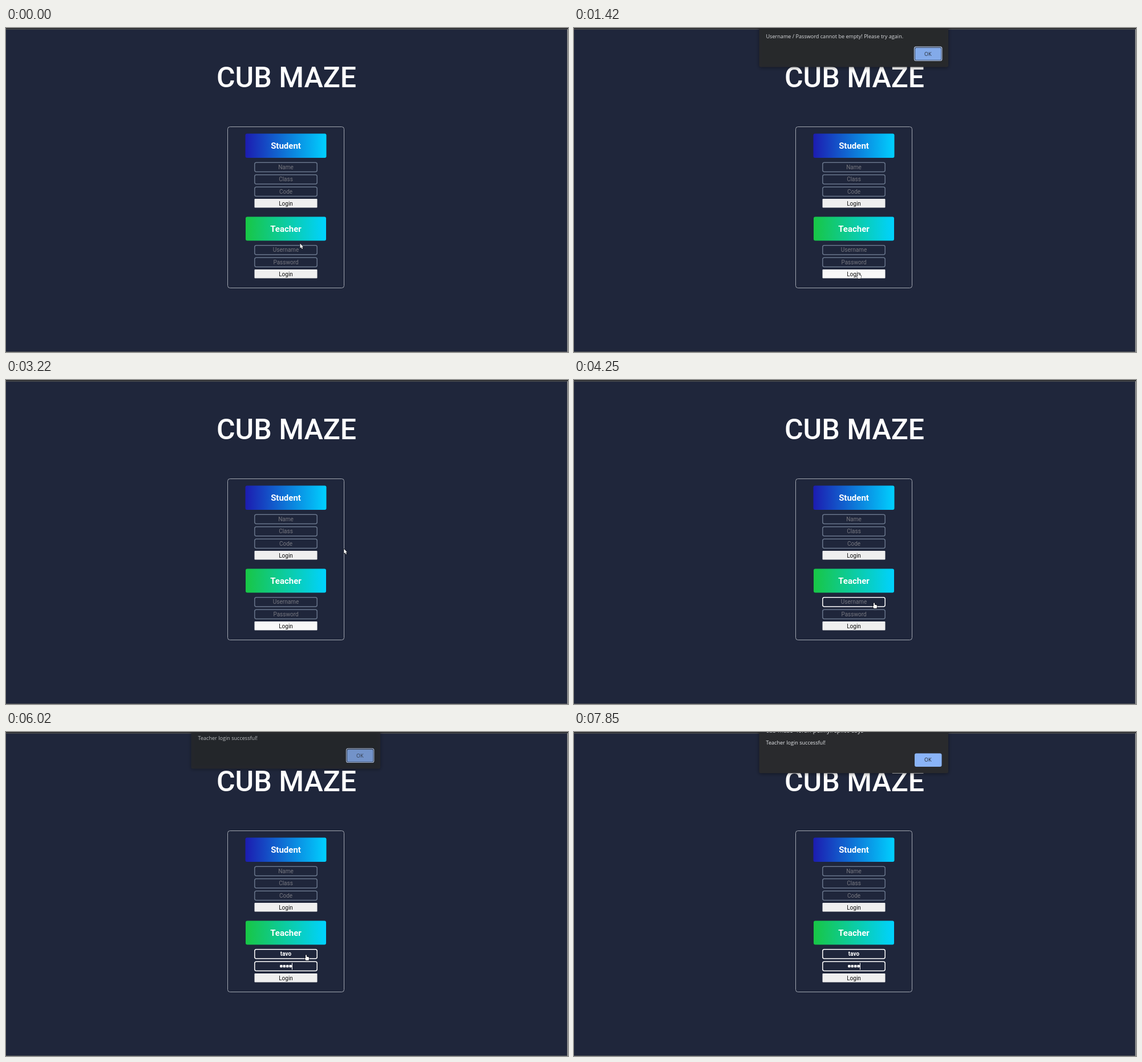
These frames come from a looping animation (985 by 569 pixels, 8.79 s). An HTML page with a canvas:

```html
<!DOCTYPE html>
<html lang="en">
<head>
<meta charset="utf-8">
<title>Cub Maze</title>
<style>
html, body { margin: 0; width: 100%; height: 100%; overflow: hidden; background: #1f263b; }
canvas { display: block; }
</style>
</head>
<body>
<canvas id="stage" width="985" height="569" aria-label="CUB MAZE login page"></canvas>
<script>
const ctx = document.getElementById('stage').getContext('2d');
const LOOP = 8790;
const UI = 'Roboto, sans-serif';
const DIALOG = '"Open Sans", sans-serif';
const MID = 490.5;
const ARROW = new Path2D('M0 0V8.2L1.9 6.5L3.2 9.4L4.6 8.8L3.3 6H5.6Z');
const HAND = new Path2D('M-.9 .9Q0-.5 .9 .9V3.6L4.4 4.4Q5.4 4.8 5.2 6L4.4 10H-.4L-2.5 6.6Q-2.6 5.4-.9 6.2Z');

// Pointer keys: time, x, y
const PATH = [
  [0, 515.5, 378.5], [170, 515.5, 378.5], [600, 508, 405], [1020, 498, 430],
  [1640, 498, 430], [1850, 580, 392], [2050, 679, 280], [2220, 672, 95],
  [2370, 630.5, 71], [2500, 624, 54], [2560, 624, 54], [2590, 624, 52],
  [3000, 624, 52], [3220, 592.5, 296], [3570, 526, 391], [6400, 526, 391],
  [6440, 533, 394], [6660, 533, 394], [6850, 700, 428], [7350, 942, 573],
  [LOOP, 942, 573]
];

const same = (a, b) => a[1] === b[1] && a[2] === b[2];

function slope(i, k) {
  const a = PATH[i - 1], b = PATH[i], c = PATH[i + 1];
  if (!a || !c || same(a, b) || same(b, c)) return 0;
  return (c[k] - a[k]) / (c[0] - a[0]);
}

function pointerAt(t) {
  let i = 0;
  while (i < PATH.length - 2 && PATH[i + 1][0] <= t) i++;
  const a = PATH[i], b = PATH[i + 1];
  const span = b[0] - a[0], u = (t - a[0]) / span, v = 1 - u;
  const axis = k =>
    a[k] * (1 + 2 * u) * v * v + b[k] * u * u * (3 - 2 * u) +
    span * (slope(i, k) * u * v * v - slope(i + 1, k) * u * u * v);
  return { x: axis(1), y: axis(2) };
}

function box(x, y, w, h, r) {
  ctx.beginPath();
  ctx.roundRect(x, y, w, h, r);
}

function fillBox(x, y, w, h, r, color) {
  box(x, y, w, h, r);
  ctx.fillStyle = color;
  ctx.fill();
}

function strokeBox(x, y, w, h, r, color, width) {
  box(x, y, w, h, r);
  ctx.strokeStyle = color;
  ctx.lineWidth = width;
  ctx.stroke();
}

function text(str, x, y, font, color, align = 'center') {
  ctx.font = font;
  ctx.fillStyle = color;
  ctx.textAlign = align;
  ctx.fillText(str, x, y);
}

function banner(label, x, y, w, h, from, to) {
  const g = ctx.createLinearGradient(x, 0, x + w, 0);
  g.addColorStop(0, from);
  g.addColorStop(1, to);
  fillBox(x, y, w, h, 3, g);
  text(label, MID, y + h / 2 + 5.5, 'bold 15px ' + UI, '#fff');
}

function field(y, hint, value = '', lit = 0) {
  const mix = (a, b) => Math.round(a + (b - a) * lit);
  const edge = `rgb(${mix(104, 255)},${mix(117, 255)},${mix(139, 255)})`;
  strokeBox(435.8, y + .8, 109.4, 16.2, 3, edge, 1.5);
  if (value) text(value, MID, y + 12.3, 'bold 10px ' + UI, '#fff');
  else if (hint) text(hint, MID, y + 12.3, '10px ' + UI, '#777880');
}

function login(y, hot) {
  fillBox(435.5, y, 110, 15.6, 1, hot ? '#f8f8f8' : '#efefef');
  text('Login', MID, y + 11.7, '10px ' + UI, '#111');
}

function caret(x, y) {
  ctx.fillStyle = '#fff';
  ctx.fillRect(x, y, 1, 12);
}

function page(t, p, open) {
  ctx.fillStyle = '#1f263b';
  ctx.fillRect(0, 0, 985, 569);
  ctx.fillStyle = '#303134';
  ctx.fillRect(0, 0, 985, 2);
  ctx.fillStyle = '#4d4f54';
  ctx.fillRect(0, 2, 985, 1);
  ctx.fillRect(0, 568, 985, 1);
  ctx.fillRect(983, 2, 1, 567);
  ctx.fillStyle = '#a9abae';
  ctx.fillRect(984, 2, 1, 567);

  text('CUB MAZE', 491.5, 104, '500 50px ' + UI, '#fff');
  strokeBox(388.5, 173.5, 204, 283, 4, '#a2a7b1', 1);

  banner('Student', 419.5, 185.5, 142, 42.5, '#1c1cb0', '#00d0ff');
  field(235.5, 'Name');
  field(257, 'Class');
  field(278.5, 'Code');
  login(300, false);

  banner('Teacher', 420, 331.5, 141, 42, '#18c645', '#00d2ff');
  const over = y => !open && p.x > 435 && p.x < 546 && p.y >= y && p.y < y + 18;
  const typed = [4540, 4740, 4800, 4850].filter(k => t >= k).length;
  const name = 'tavo'.slice(0, typed);
  const dots = [5270, 5430, 5610, 5740].filter(k => t >= k).length;
  const passLit = Math.max(over(403) ? 1 : 0, Math.min(1, Math.max(0, (t - 4900) / 110)));
  field(381, 'Username', name, over(381) || t >= 3570 ? 1 : 0);
  field(402.5, dots ? '' : 'Password', '', passLit);
  login(424, t > 930 && t < 3570);

  for (let i = 0; i < dots; i++) {
    fillBox(MID - dots * 2.7 + i * 5.4 + .5, 409, 4.4, 4.4, 1.2, '#fff');
  }
  if (t >= 4900) caret(dots ? Math.round(MID + dots * 2.7) : 490, 405.5);
  else if (typed) {
    ctx.font = 'bold 10px ' + UI;
    caret(Math.round(MID + ctx.measureText(name).width / 2), 384);
  } else if (t >= 3730 && t < 4250) caret(490, 384);
}

function dialog(message, progress, ring) {
  const p = Math.min(1, progress);
  ctx.save();
  ctx.globalAlpha = 1 - Math.pow(1 - p, 1.6);
  ctx.translate(0, -20 * (1 - p));
  ctx.shadowColor = 'rgba(0,0,0,.45)';
  ctx.shadowBlur = 6;
  ctx.shadowOffsetY = 1;
  fillBox(324.5, -30, 331.5, 102.3, 3, '#292a2d');
  ctx.shadowColor = 'transparent';
  text('cub-maze--loran-pelmy.repl.co says', 336.5, 1.2, '10.4px ' + DIALOG, '#e8eaed', 'left');
  text(message, 336.5, 21.6, '9.1px ' + DIALOG, '#e8eaed', 'left');
  if (ring) {
    strokeBox(596.5, 37, 48.3, 24.3, 3, '#c5d9fb', 1.2);
    strokeBox(597.6, 38.1, 46.1, 22.1, 2, '#33435f', .8);
  }
  const inset = ring ? 1 : 0;
  fillBox(597 + inset, 37.5 + inset, 47.5 - 2 * inset, 23.5 - 2 * inset, 3 - inset, '#8ab4f8');
  text('OK', 620.3, 52.4, '9px ' + DIALOG, '#202124');
  ctx.restore();
}

function pointer(p, hand) {
  ctx.save();
  ctx.translate(p.x, p.y);
  const shape = hand ? HAND : ARROW;
  ctx.lineJoin = 'round';
  ctx.lineWidth = 1.2;
  ctx.strokeStyle = '#111318';
  ctx.stroke(shape);
  ctx.fillStyle = '#fff';
  ctx.fill(shape);
  ctx.restore();
}

function onControl(p) {
  return p.x > 435 && p.x < 546 &&
    [381, 403, 424].some(y => p.y >= y && p.y < y + 17);
}

function draw(t) {
  const p = pointerAt(t);
  const first = t >= 1170 && t < 3000;
  const second = t >= 5930;
  page(t, p, first || second);
  if (first) dialog('Username / Password cannot be empty! Please try again.', (t - 1170) / 310, true);
  if (second) dialog('Teacher login successful!', (t - 5930) / 150, t < 7850);
  pointer(p, second || onControl(p));
}

const start = performance.now();
function tick() {
  draw((performance.now() - start) % LOOP);
  requestAnimationFrame(tick);
}
tick();
</script>
</body>
</html>
```
